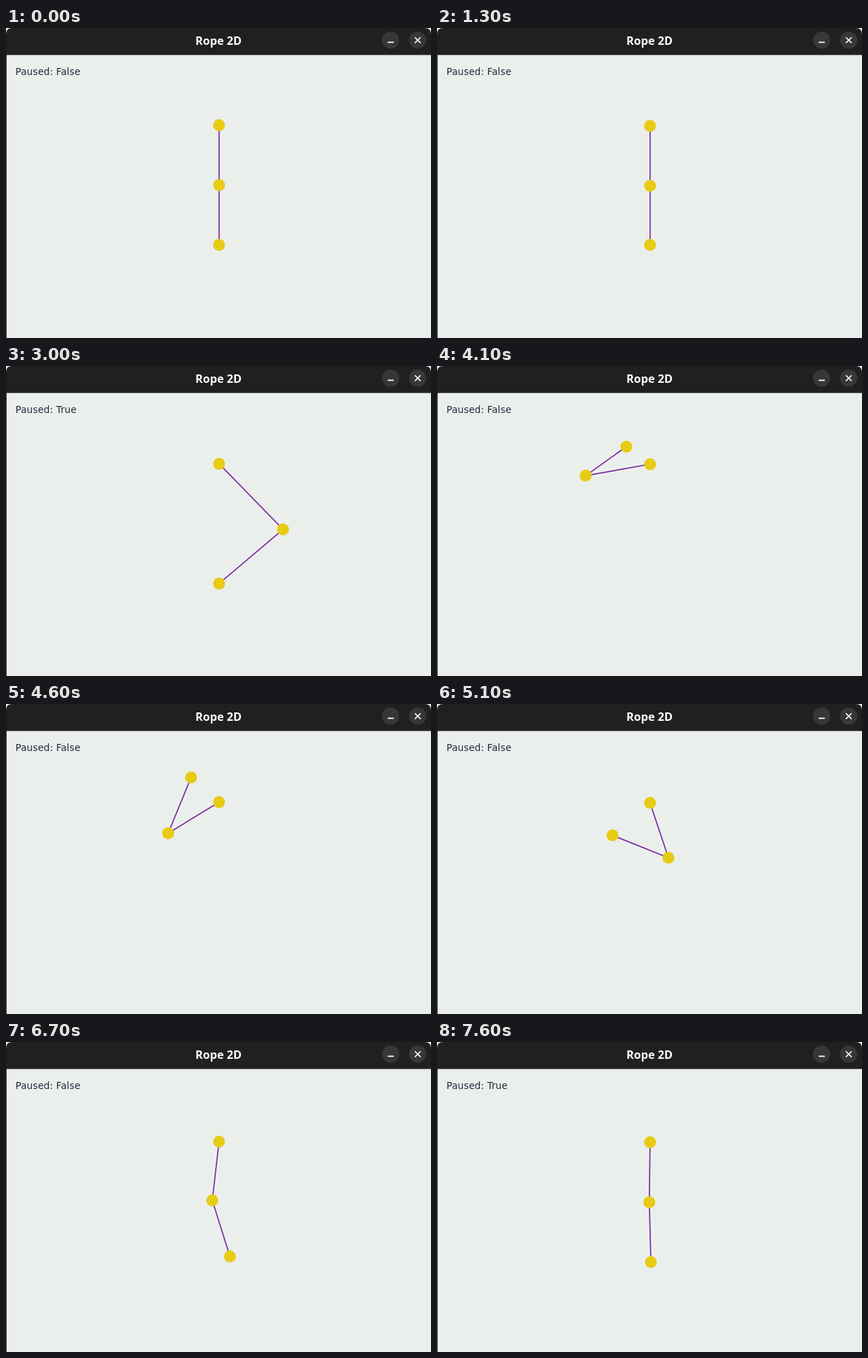
Animation, 606 px wide and 442 px high, one loop 8000 ms. Source, as an HTML page:

```html
<!DOCTYPE html>
<html lang="en">
<head>
<meta charset="utf-8">
<title>Rope 2D</title>
<style>
  html, body { margin: 0; width: 100%; height: 100%; overflow: hidden; background: #ebefec; }
  svg { display: block; width: 100vw; height: 100vh; }
  .title { font: 700 16.2px "Noto Sans", "Open Sans", sans-serif; fill: #fff; text-anchor: middle; }
  .status { font: 13.5px "DejaVu Sans", "Noto Sans", sans-serif; letter-spacing: .12px; fill: #1c2b3c; }
  .rope { fill: none; stroke: #7b2da0; stroke-width: 1.7; }
  .ball { fill: #e8cb14; }
  .icon { fill: none; stroke: #fff; stroke-width: 1.6; }
</style>
</head>
<body>
<svg viewBox="0 0 606 442">
  <rect width="606" height="442" fill="#ebefec"/>
  <rect y="38" width="1" height="404" fill="#3a3b38"/>
  <path d="M0 38.5V9Q0 0 9 0H597Q606 0 606 9V38.5Z" fill="#20211e"/>
  <text class="title" x="303" y="24">Rope 2D</text>
  <circle cx="548.5" cy="17.3" r="12.3" fill="#373835"/>
  <circle cx="587" cy="17.3" r="12.3" fill="#373835"/>
  <path class="icon" d="M544.3 20.4H553M583 13.2L591.2 21.4M591.2 13.2L583 21.4"/>
  <text class="status" id="status" x="13.5" y="66.5"></text>
  <polyline class="rope" id="rope"/>
  <circle class="ball" r="8.5"/>
  <circle class="ball" r="8.5"/>
  <circle class="ball" r="8.5"/>
</svg>
<script>
const LOOP = 8000, STEP = 100;
const PAUSE = 2100, DRAG_END = 2700, RELEASE = 3500, RESUME = 3600, PAUSE_AGAIN = 7600;
const ANCHOR_X = 303.8;
const GRABBED = [314.3, 228], PULLED = [395, 233];

// Swing turning points: time, then angle (degrees from straight down)
// and length of the upper segment, then of the lower one.
const SWING = [
  [RELEASE, 44.3, 130.7, -49.8, 119.5],
  [3700, 23, 93, -14, 78],
  [4100, -79.9, 93.2, 125.5, 71.2],
  [4300, -90, 90, 140, 84],
  [4700, -44, 84, 166, 86],
  [5100, 18.5, 82.6, 248.1, 85.9],
  [5300, 31, 84, 283, 86],
  [5900, -7.9, 81.8, 379.4, 82.4],
  [6200, -9, 83, 384, 83],
  [PAUSE_AGAIN, -0.7, 85.5, 361.5, 85.2]
];

const status = document.getElementById("status");
const rope = document.getElementById("rope");
const balls = document.querySelectorAll(".ball");

const clamp = (v, lo, hi) => Math.min(hi, Math.max(lo, v));
const mix = (a, b, u) => a.map((v, i) => v + (b[i] - v) * u);

function slope(i, col) {
  const a = SWING[i], b = SWING[i + 1];
  return a && b ? (b[col] - a[col]) / (b[0] - a[0]) : 0;
}

// Harmonic mean keeps the curve from overshooting turning points.
function tangent(i, col) {
  const before = slope(i - 1, col), after = slope(i, col);
  return before * after > 0 ? 2 * before * after / (before + after) : 0;
}

function swing(time) {
  const t = clamp(time, RELEASE, PAUSE_AGAIN);
  const i = Math.max(0, SWING.findIndex(key => key[0] >= t) - 1);
  const a = SWING[i], b = SWING[i + 1], span = b[0] - a[0];
  const u = (t - a[0]) / span, v = 1 - u;
  return [1, 2, 3, 4].map(col =>
    v * v * (1 + 2 * u) * a[col] + u * u * (3 - 2 * u) * b[col] +
    span * u * v * (v * tangent(i, col) - u * tangent(i + 1, col)));
}

function hang([x, y], degrees, length) {
  const angle = degrees * Math.PI / 180;
  return [x + length * Math.sin(angle), y + length * Math.cos(angle)];
}

function pose(t) {
  if (t < RESUME) {
    const sag = t < 1300 ? 0 : 1;
    const drag = clamp((t - PAUSE) / (DRAG_END - PAUSE), 0, 1);
    const mid = t < PAUSE ? [ANCHOR_X, 224 + sag] : mix(GRABBED, PULLED, drag);
    return [[ANCHOR_X, 138.4 + sag], mid, [ANCHOR_X, t < 1700 ? 309.2 : 310.2]];
  }
  // The anchor sinks slowly while the rope swings.
  const sunk = (Math.min(t, PAUSE_AGAIN) - RESUME) / 1150;
  const top = [ANCHOR_X, Math.round(139.6 + sunk)];
  const [upperAngle, upperLength, lowerAngle, lowerLength] = swing(t);
  const mid = hang(top, upperAngle, upperLength);
  return [top, mid, hang(mid, lowerAngle, lowerLength)];
}

function draw(t) {
  const points = pose(t);
  const paused = (t >= PAUSE && t < RESUME) || t >= PAUSE_AGAIN;
  status.textContent = "Paused: " + (paused ? "True" : "False");
  rope.setAttribute("points", points.join(" "));
  points.forEach(([x, y], i) => {
    balls[i].setAttribute("cx", x);
    balls[i].setAttribute("cy", y);
  });
}

const start = performance.now();
function tick() {
  const t = (performance.now() - start) % LOOP;
  draw(Math.floor(t / STEP) * STEP);
  requestAnimationFrame(tick);
}
draw(0);
requestAnimationFrame(tick);
</script>
</body>
</html>
```
